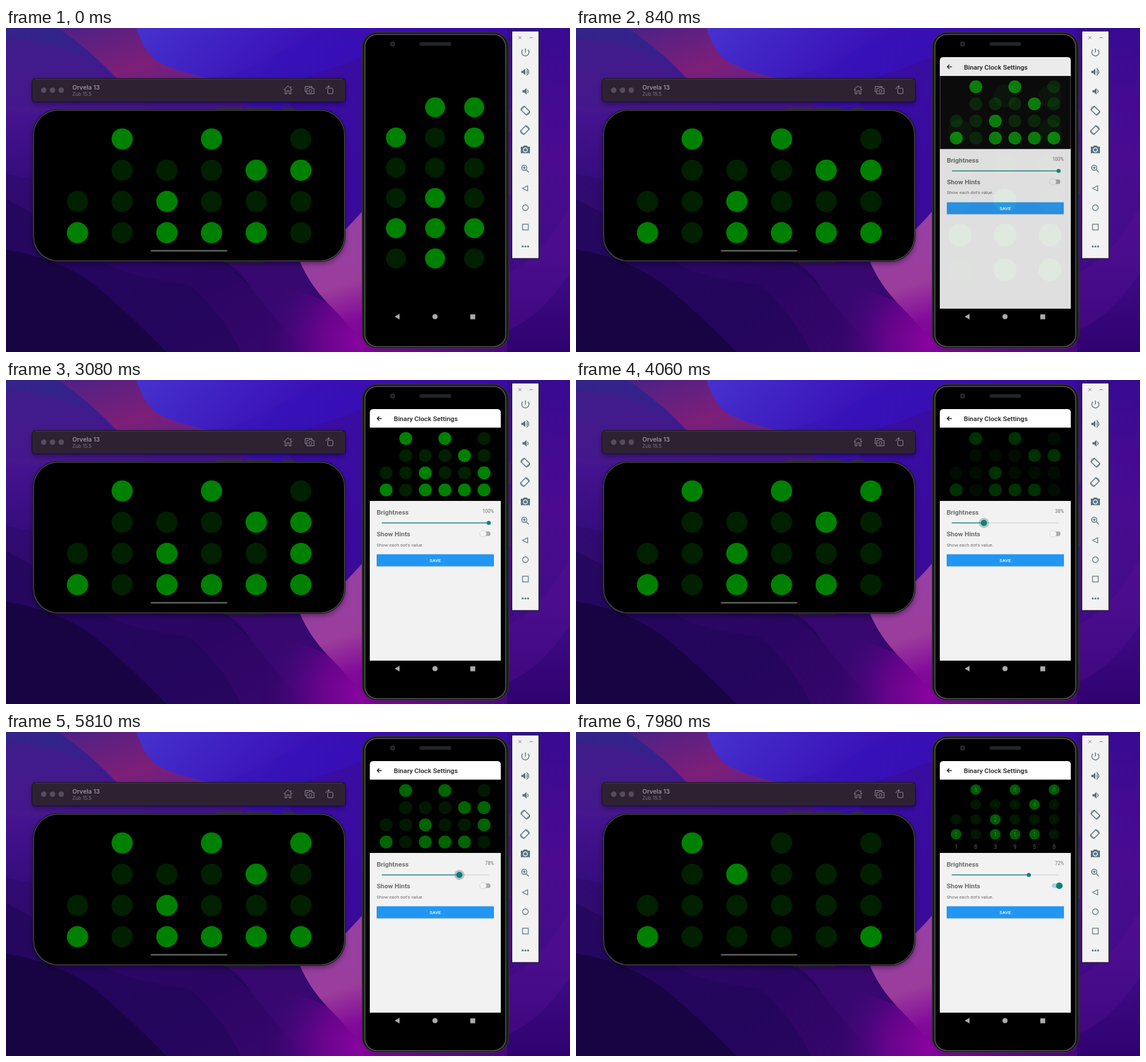
Animation of 986x568 px, one loop 8 s. Source, as an HTML page:

```html
<!DOCTYPE html>
<html lang="en">
<head>
<meta charset="utf-8">
<title>Binary Clock</title>
<style>
  html, body { margin: 0; width: 100%; height: 100%; overflow: hidden; background: #240653; }
  svg { display: block; width: 986px; height: 568px; }
  text { font-family: Roboto, Arial, sans-serif; }
  .desk { font-family: Inter, Arial, sans-serif; }
  .line { fill: none; stroke: #969097; stroke-width: 1; stroke-linejoin: round; }
  .tool { fill: none; stroke: #587482; stroke-width: 1.5; }
  .tool .solid { fill: #587482; stroke: none; }
  .digit { text-anchor: middle; }
  #preview { mix-blend-mode: screen; }
</style>
</head>
<body>
<svg id="stage" viewBox="0 0 986 568">
  <defs>
    <linearGradient id="base" x1="0" y1="0" x2="0" y2="1">
      <stop offset="0" stop-color="#32248a"/><stop offset=".25" stop-color="#461391"/>
      <stop offset=".6" stop-color="#2b0870"/><stop offset="1" stop-color="#170240"/>
    </linearGradient>
    <linearGradient id="blue" x1="0" y1="0" x2="1" y2=".7">
      <stop offset="0" stop-color="#4632cf"/><stop offset=".3" stop-color="#3a0fb5"/>
      <stop offset=".65" stop-color="#3909a4"/><stop offset="1" stop-color="#43097e"/>
    </linearGradient>
    <linearGradient id="wine" x1="0" y1="0" x2="1" y2="1">
      <stop offset="0" stop-color="#4b2186"/><stop offset=".6" stop-color="#7d1f78"/>
      <stop offset="1" stop-color="#60208d"/>
    </linearGradient>
    <linearGradient id="dusk" x1="0" y1="0" x2="1" y2="1">
      <stop offset="0" stop-color="#320b72"/><stop offset=".6" stop-color="#2a0562"/>
      <stop offset="1" stop-color="#37066c"/>
    </linearGradient>
    <linearGradient id="pink" gradientUnits="userSpaceOnUse" x1="560" y1="390" x2="620" y2="568">
      <stop offset="0" stop-color="#983fa2"/><stop offset=".35" stop-color="#9b3d9b"/>
      <stop offset=".7" stop-color="#820a9a"/><stop offset="1" stop-color="#750494"/>
    </linearGradient>
    <radialGradient id="glow" gradientUnits="userSpaceOnUse" cx="620" cy="550" r="165">
      <stop offset="0" stop-color="#8a04a0"/><stop offset=".45" stop-color="#6f0390" stop-opacity=".85"/>
      <stop offset="1" stop-color="#4a0580" stop-opacity="0"/>
    </radialGradient>
    <linearGradient id="floor" x1="0" y1="0" x2="1" y2="0">
      <stop offset="0" stop-color="#7a0497"/><stop offset="1" stop-color="#4a0580"/>
    </linearGradient>
    <linearGradient id="side" x1="0" y1="0" x2="0" y2="1">
      <stop offset="0" stop-color="#380a92"/><stop offset=".4" stop-color="#4a0b90"/>
      <stop offset=".7" stop-color="#420c88"/><stop offset="1" stop-color="#2f0270"/>
    </linearGradient>
    <filter id="shade" x="-10%" y="-20%" width="120%" height="150%">
      <feDropShadow dx="0" dy="4" stdDeviation="5" flood-opacity=".35"/>
    </filter>
    <clipPath id="screen"><path d="M636 492V57q0-6 6-6H859q6 0 6 6V492Z"/></clipPath>
  </defs>

  <g id="wallpaper">
    <path fill="url(#base)" d="M0 0H986V568H0Z"/>
    <path fill="url(#wine)" d="M90 0H235L365 95H200Q150 40 90 0Z"/>
    <path fill="#461a8a" d="M0 20Q90 20 150 62T265 150H0Z" opacity=".6"/>
    <path fill="url(#blue)" d="M228 0H986V568H700Q600 400 500 280Q440 130 365 91Q295 76 262 57Q240 38 228 0Z"/>
    <path fill="#3213b8" d="M365 88Q440 70 485 40T625 12V95L590 240Z" opacity=".4"/>
    <path fill="#3c0a92" d="M500 95Q590 65 625 50V430H480Z" opacity=".5"/>
    <path fill="url(#dusk)" d="M0 255Q180 290 330 380Q440 450 540 568H0Z"/>
    <path fill="#22065b" d="M0 300Q90 345 140 390T320 450Q380 500 410 568H0Z" opacity=".7"/>
    <path fill="#17043f" d="M0 388Q100 405 160 455T280 568H0Z" opacity=".85"/>
    <path fill="#37086f" d="M365 400H520Q550 490 640 540V568H525Q460 500 425 450Q400 415 365 400Z"/>
    <path fill="url(#glow)" d="M400 440Q470 440 560 480L640 530V568H450Z"/>
    <path fill="url(#pink)" d="M512 405Q570 390 640 300V568Q590 510 566 486Q530 450 512 405Z"/>
    <path fill="url(#floor)" d="M630 540H885V568H630Z"/>
    <path fill="url(#side)" d="M876 0H986V568H876Z"/>
    <path fill="#5a1195" d="M876 430Q940 400 986 310V430Q930 510 876 530Z" opacity=".35"/>
  </g>

  <g id="window" filter="url(#shade)">
    <rect x="45.5" y="88.5" width="548" height="41" rx="6" fill="#2d2433" stroke="#151019"/>
    <path d="M51 89.5H588" stroke="#51485a" stroke-width=".7"/>
  </g>
  <g fill="#554d5b"><circle cx="66" cy="109" r="4.8"/><circle cx="81.3" cy="109" r="4.8"/><circle cx="96.6" cy="109" r="4.8"/></g>
  <text class="desk" x="116" y="108" font-size="10.7" font-weight="600" fill="#969097">Orvela 13</text>
  <text class="desk" x="116" y="118.5" font-size="8.5" fill="#77707b">Zub 15.5</text>
  <g class="line">
    <path d="M485.500 108.500L493 101.500L500.500 108.500M488 107V115.500H491V110H495V115.500H498V107M498 105V102"/>
    <path d="M525 112H523V102.500H535V105M526 106H529L530 104.500H534L535 106H538.500V115.500H526Z"/>
    <circle cx="532.2" cy="110.700" r="2.700"/>
    <rect x="562.500" y="105.500" width="9" height="9.500" rx="1"/><path d="M559.500 107Q559.500 102.500 565 102.500M563 100.500L565.500 102.500L563 104.500"/>
  </g>

  <path d="M368 141.500H413M420 141.500H465M483 141.500H504M380 409.700H452" stroke="#37313e" stroke-width="3"/>
  <rect x="48" y="144" width="544" height="264.500" rx="43" fill="#000" stroke="#171719" stroke-width="3" filter="url(#shade)"/>
  <rect x="48.200" y="144.200" width="543.600" height="264" rx="43" fill="#000" stroke="#444447" stroke-width="1.600"/>
  <rect x="253" y="389" width="134" height="3" rx="1.500" fill="#575757"/>
  <g id="wide"></g>

  <path d="M880 145V182M880 219V291" stroke="#353535" stroke-width="3"/>
  <rect x="622.500" y="7.500" width="256.500" height="554" rx="26" fill="#1b1b1b" stroke="#3a3a3a"/>
  <rect x="627.500" y="11.500" width="246" height="547" rx="21" fill="#000" stroke="#565656" stroke-width="1.600"/>
  <circle cx="676" cy="28" r="3.500" fill="#191919" stroke="#383838" stroke-width="1.500"/>
  <rect x="723" y="25" width="55" height="6" rx="2" fill="#252525"/>
  <g fill="#aaa"><path d="M679.500 506L688 501V511Z"/><circle cx="750" cy="506" r="4.600"/><rect x="811.700" y="502" width="8.600" height="8.600"/></g>

  <g clip-path="url(#screen)">
    <g id="clock"></g>
    <g id="settings">
      <path fill="#f2f2f2" d="M636 51H865V492H636Z"/>
      <g id="content">
        <path fill="#fff" d="M636 51H865V84H636Z"/>
        <path d="M657 67.500H649M652.700 63.700L648.900 67.500L652.700 71.300" fill="none" stroke="#111" stroke-width="1.300"/>
        <text x="678" y="72" font-size="11.700" font-weight="500" fill="#1c1c1e">Binary Clock Settings</text>
        <rect id="panel" x="636" y="83.500" width="229" height="128.500"/>
        <g id="preview"></g>
        <g id="hints" font-size="10"></g>
        <g fill="#6e6e6e">
          <text x="648" y="236" font-size="11.500" font-weight="700">Brightness</text>
          <text x="648" y="273.700" font-size="11.500" font-weight="700">Show Hints</text>
          <text x="648" y="291.500" font-size="8.100">Show each dot's value.</text>
          <text id="percent" x="853" y="233" font-size="8.300" text-anchor="end"></text>
        </g>
        <path d="M657 250.500H844" stroke="#d2d5d5" stroke-width="1.400"/>
        <path id="filled" stroke="#168078" stroke-width="1.500"/>
        <circle id="halo" cy="250.500" r="9" fill="#526f75" opacity=".35"/>
        <circle id="thumb" cy="250.500" fill="#0d817b"/>
        <rect id="track" x="832" y="265.500" width="15" height="8" rx="4"/>
        <circle id="knob" cy="269.500" r="5.800"/>
        <g id="save">
          <rect x="648" y="306.500" width="205" height="21" fill="#000" opacity=".14"/>
          <rect x="648" y="305.500" width="205" height="21" rx="1" fill="#2196f3"/>
          <text x="750.500" y="319" font-size="8.100" font-weight="500" fill="#fff" text-anchor="middle">SAVE</text>
        </g>
      </g>
    </g>
  </g>

  <rect x="884.500" y="5.500" width="47" height="398.500" fill="#f2f2f2" stroke="#0c0818"/>
  <path d="M896 14.500L901 19.500M901 14.500L896 19.500M915 17H921" stroke="#777" stroke-width="1"/>
  <g class="tool">
    <path d="M908 36V43M903.700 38A6.300 6.300 0 1 0 912.300 38"/>
    <g transform="translate(907 77)"><path class="solid" d="M-6-2H-3L1-6V6L-3 2H-6Z"/><path d="M3-3Q6 0 3 3M3-6Q11 0 3 6"/></g>
    <g transform="translate(908 111)"><path class="solid" d="M-5-2H-2L2-6V6L-2 2H-5Z"/><path d="M3.500-3Q6 0 3.500 3"/></g>
    <g id="turn" transform="translate(908 145)">
      <rect x="-6.500" y="-4.300" width="13" height="8.600" transform="rotate(45)"/>
      <path d="M-8-1Q-7.500-7-1-8M1 8Q7 7 8 1" stroke-width="1.100"/>
    </g>
    <use href="#turn" transform="matrix(-1 0 0 1 1815 34)"/>
    <g transform="translate(908 213)"><path class="solid" d="M-8-5H-4L-2.500-7H2.500L4-5H8V6.500H-8Z"/><circle r="3.500" cy=".7" stroke="#f2f2f2" fill="none"/></g>
    <circle cx="906" cy="245" r="4.500"/><path d="M909.500 248.500L914 253M903.500 245H908.500M906 242.500V247.500"/>
    <path d="M903 281L912 276.500V285.500Z" stroke-width="1.300"/>
    <circle cx="908" cy="315" r="5" stroke-width="1.300"/>
    <rect x="903" y="344" width="10" height="10" stroke-width="1.300"/>
    <g class="solid"><circle cx="903.300" cy="383" r="1.700"/><circle cx="908" cy="383" r="1.700"/><circle cx="912.700" cy="383" r="1.700"/></g>
  </g>
</svg>

<script>
const LOOP = 8000, STEP = 70;
const LIT = '#008000', DIM = '#002000';
const DIGIT_BITS = [2, 4, 3, 4, 3, 4];
const WIDE_TICKS = [770, 1890, 3010, 3990, 5110, 6230, 7350];
const TALL_TICKS = [280, 1260, 2590, 3500, 4620, 5740, 6860, 7980];
const DRAG = [[3430, 100], [3990, 38], [4060, 30], [4270, 10], [4480, 8], [5110, 67], [5180, 77.5],
  [5390, 95], [5530, 95], [6090, 50], [6300, 65], [6370, 70.6], [6510, 73], [6650, 72]];
const FADE = [[490, 0], [560, .03], [630, .15], [700, .376], [770, .7], [840, .92], [910, 1]];
const GROW = [[490, 0], [560, .35], [630, .7], [700, .89], [840, .98], [910, 1]];

const $ = id => document.getElementById(id);
const set = (el, attrs) => { for (const k in attrs) el.setAttribute(k, attrs[k]); };
function add(parent, tag, attrs) {
  const el = document.createElementNS('http://www.w3.org/2000/svg', tag);
  set(el, attrs);
  return parent.appendChild(el);
}

function track(points, t) {
  if (t <= points[0][0]) return points[0][1];
  for (let i = 1; i < points.length; i++) {
    const [t0, a] = points[i - 1], [t1, b] = points[i];
    if (t <= t1) return a + (b - a) * (t - t0) / (t1 - t0);
  }
  return points[points.length - 1][1];
}

// One column of dots per entry in `bits`, lowest bit at the bottom.
function makeDots(parent, bits, rows) {
  return bits.flatMap((count, col) => Array.from({ length: count }, (_, bit) =>
    ({ col, bit, row: rows - 1 - bit, el: add(parent, 'circle', {}) })));
}
function placeDots(dots, x, dx, y, dy, r) {
  for (const d of dots) set(d.el, { cx: x + d.col * dx, cy: y + d.row * dy, r });
}
function light(dots, values) {
  for (const d of dots) set(d.el, { fill: values[d.col] >> d.bit & 1 ? LIT : DIM });
}

const wide = makeDots($('wide'), DIGIT_BITS, 4);
const tall = makeDots($('clock'), [5, 6, 6], 6);
const preview = makeDots($('preview'), DIGIT_BITS, 4);
placeDots(wide, 125, 78.1, 194.5, 54.8, 18.6);
placeDots(tall, 681.7, 68.4, 139, 53, 17.5);

const hintX = col => 664.5 + col * 34.25;
for (const d of preview) {
  d.hint = add($('hints'), 'text', { class: 'digit', x: hintX(d.col), y: 104.5 + d.row * 26.1 });
  d.hint.textContent = 1 << d.bit;
}
const totals = DIGIT_BITS.map((_, col) =>
  add($('hints'), 'text', { class: 'digit', x: hintX(col), y: 204.5, fill: '#595959' }));

function clockAt(start, ticks, t) {
  const seconds = start + ticks.filter(tick => t >= tick).length;
  return [18, 39 + Math.floor(seconds / 60), seconds % 60];
}
const digits = time => time.flatMap(n => [Math.floor(n / 10), n % 10]);
const zoom = s => `translate(750.5 271.5) scale(${s}) translate(-750.5 -271.5)`;

function draw(t) {
  const time = clockAt(50, TALL_TICKS, t), shown = digits(time);
  light(wide, digits(clockAt(54, WIDE_TICKS, t)));
  light(tall, time);
  light(preview, shown);

  const fade = track(FADE, t), grow = track(GROW, t);
  set($('clock'), { transform: zoom(1 + .153 * grow) });
  set($('settings'), { opacity: fade });
  set($('content'), { transform: zoom(.85 + .15 * grow) });
  const grey = Math.round(144 * (1 - fade));
  set($('panel'), { fill: `rgb(${grey},${grey},${grey})` });
  set($('save'), { opacity: Math.min(1, .2 + fade * .8) });

  const level = track(DRAG, t), bright = Math.round(track(DRAG, t - STEP));
  const x = 657 + 1.87 * level, pressed = t >= 3430 && t < 6720;
  set($('filled'), { d: `M657 250.5H${x}`, opacity: fade });
  set($('thumb'), { cx: x, r: pressed ? 5.4 : 3.6, opacity: fade });
  set($('halo'), { cx: x, visibility: pressed ? 'visible' : 'hidden' });
  $('percent').textContent = bright + '%';
  set($('preview'), { opacity: bright / 100 });

  const on = Math.max(0, Math.min(1, (t - 7210) / 210)), hints = t >= 7350;
  set($('track'), { fill: on > .5 ? '#b5d0d8' : '#aaa' });
  set($('knob'), { cx: 834 + 11 * on, fill: on > .5 ? '#0d8179' : '#f4f4f4', stroke: on > .5 ? 'none' : '#d5d5d5' });
  set($('hints'), { visibility: hints ? 'visible' : 'hidden' });
  if (hints) placeDots(preview, 664.5, 34.25, 101, 26.1, 9.3);
  else placeDots(preview, 664.5, 34.25, 102.5, 30.1, 11.3);
  for (const d of preview) set(d.hint, { fill: shown[d.col] >> d.bit & 1 ? '#3d7a3d' : '#0b250b' });
  totals.forEach((el, col) => { el.textContent = shown[col]; });
}

const start = performance.now();
function frame(now) {
  const t = Math.max(0, now - start) % LOOP;
  draw(Math.floor(t / STEP) * STEP);
  requestAnimationFrame(frame);
}
draw(0);
requestAnimationFrame(frame);
</script>
</body>
</html>
```
